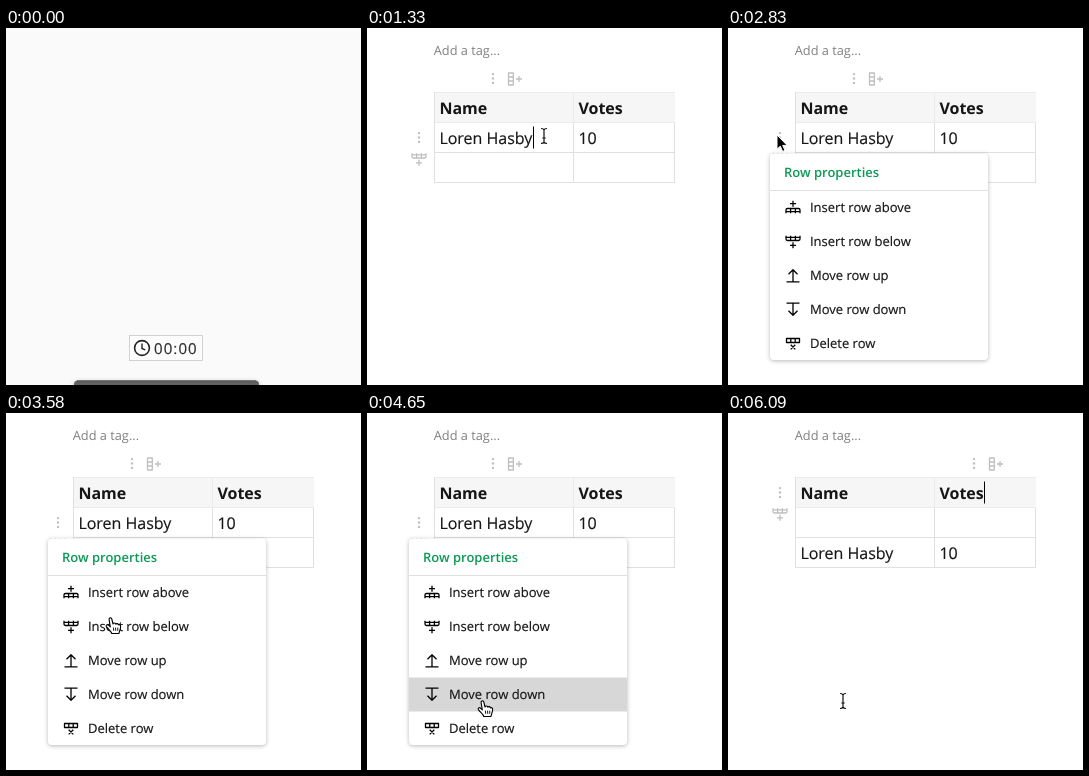
These frames come from a looping animation (355 by 357 pixels, 6170 ms). An HTML page:

```html
<!DOCTYPE html>
<html lang="en">
<head>
<meta charset="utf-8">
<title>Table row menu</title>
<style>
  html, body { margin: 0; width: 100%; height: 100%; overflow: hidden; background: #fff; }
  svg { display: block; width: 355px; height: 357px; font: 16px "Open Sans", sans-serif; fill: #161616; }
  text { stroke: currentColor; stroke-width: .15; text-rendering: geometricPrecision; }
  .line { fill: none; stroke: #e0e0e0; }
  .line.soft { stroke: #ebebeb; }
  .icon { fill: none; stroke: currentColor; stroke-width: 1.3; stroke-linejoin: round; }
  .dots { fill: currentColor; }
  .tool { color: #bfbfbf; }
  .tool.dark { color: #333; }
  .head { font-weight: 700; stroke: none; }
  .small { font-size: 13px; }
  .title { font-size: 13px; font-weight: 600; fill: #0b9a56; stroke: none; }
  .tag { font-size: 12.8px; fill: #808080; stroke: none; }
  .clock { font-size: 15px; letter-spacing: 1.1px; fill: #333; }
  .panel { filter: drop-shadow(0 1px 2px rgba(0, 0, 0, .28)); }
</style>
</head>
<body>
<svg viewBox="0 0 355 357">
  <defs>
    <g id="dots" class="dots">
      <circle cy="-4.4" r="1.2"/><circle r="1.2"/><circle cy="4.4" r="1.2"/>
    </g>
    <path id="below" class="icon" d="M-7-5.8v3.4q0 1.4 1.4 1.4h11.2q1.4 0 1.4-1.4v-3.4M-7-4.2h14M-2.4-5.8v4.8M2.4-5.8v4.8M0 .8v6M-3 3.8h6"/>
    <use id="above" href="#below" transform="scale(1 -1)"/>
    <path id="up" class="icon" d="M-6.5 6.3h13M0 6v-11.5M-4.5-1.2L0-5.7L4.5-1.2"/>
    <path id="down" class="icon" d="M-6.5-6.3h13M0-6v11.5M-4.5 1.2L0 5.7L4.5 1.2"/>
    <path id="delete" class="icon" d="M-6.5-5h13v4h-13zM-2.2-5v4M2.2-5v4M-2.3 1.3l4.6 4.6M2.3 1.3l-4.6 4.6"/>
    <path id="column" class="icon" d="M-6.5-6h4.8v12h-4.8zM-6.5-2h4.8M-6.5 2h4.8M1 0h6M4-3v6"/>
  </defs>

  <g id="intro">
    <rect width="355" height="357" fill="#fafafa"/>
    <rect x="123.5" y="307.5" width="73" height="25" fill="#fcfcfc" stroke="#d2d2d2"/>
    <circle cx="136" cy="320" r="7.4" fill="none" stroke="#222" stroke-width="1.6"/>
    <path d="M136 315.5v5l3.2 1.4" fill="none" stroke="#222" stroke-width="1.4"/>
    <text class="clock" x="148" y="326">00:00</text>
    <rect class="panel" x="68" y="352.5" width="185" height="20" rx="4" fill="#626262"/>
    <path d="M71 353h179" stroke="#505050"/>
  </g>

  <g id="editor">
    <text class="tag" x="66.7" y="27">Add a tag...</text>
    <rect x="67" y="64" width="241" height="31" fill="#f6f6f6"/>
    <path class="line soft" d="M67 64.5H308M67 94.5H308M206.5 64V95"/>
    <path class="line" d="M67 124.5H308M67 154.5H308M67.5 64V155M206.5 95V155M307.5 95V155"/>
    <text class="head" x="72.4" y="86">Name</text>
    <text class="head" x="211.4" y="86">Votes</text>
    <g id="entry">
      <text x="72.4" y="116">Loren Hasby</text>
      <text x="211.4" y="116">10</text>
    </g>
    <g id="colTools" class="tool">
      <use href="#dots" y="50.5"/><use href="#column" x="22" y="51"/>
    </g>
    <rect id="button" x="41" y="98" width="22" height="25" rx="2" fill="#d6d6d6"/>
    <g id="rowTools" class="tool">
      <use href="#dots" x="52"/><use href="#below" x="52" y="21.5"/>
    </g>
    <path id="caret" d="M.5 0v22" stroke="#000"/>
    <g id="menu">
      <rect class="panel" x="42" y="125.5" width="218" height="206.5" rx="4" fill="#fff"/>
      <text class="title" x="56" y="149">Row properties</text>
      <path class="line" d="M42 162.5H260"/>
      <rect id="hover" x="42" width="218" height="34" fill="#d7d7d7"/>
    </g>
    <g id="cursor">
      <path id="beam" d="M-3-7.5Q-.4-7.5 0-6Q.4-7.5 3-7.5M-3 7.5Q-.4 7.5 0 6Q.4 7.5 3 7.5M0-6V6M-1.7 2h3.4" fill="none" stroke="#111" stroke-width="1.2"/>
      <path id="arrow" d="M0 0V14.2L3.3 11.2L5.6 16.4L8 15.4L5.7 10.4H10.2Z" fill="#000" stroke="#fff"/>
      <g id="hand" fill="#fff" stroke="#000" stroke-width="1.1" stroke-linejoin="round">
        <path d="M-1.9 1.6C-2.2-.4 .3-.9 .8 1L2 6C2.4 4.6 4.5 4.7 4.8 6.2C5.4 5.2 7.2 5.5 7.4 6.9C8.2 6.2 9.6 6.8 9.6 8.3C9.8 11 8.4 12.5 8 15.5H.8C.2 13.5-2.5 11.5-4.6 8.6C-5.5 7-3.6 6-2.3 7.3L-.7 8.8Z"/>
        <path d="M2.4 9.6l.3 3.2M4.6 9.6l.1 3.2M6.8 9.6l-.1 3.2" stroke-width=".9"/>
      </g>
    </g>
  </g>
</svg>
<script>
const LOOP = 6170;
const $ = id => document.getElementById(id);
const show = (id, on) => { $(id).style.display = on ? '' : 'none'; };
const move = (id, x, y) => $(id).setAttribute('transform', `translate(${x} ${y})`);

const items = [
  ['above', 'Insert row above'], ['below', 'Insert row below'],
  ['up', 'Move row up'], ['down', 'Move row down'], ['delete', 'Delete row']
];
$('menu').insertAdjacentHTML('beforeend', items.map(([icon, label], i) => `
  <use href="#${icon}" x="65" y="${179.5 + i * 34}"/>
  <text class="small" x="82" y="${184 + i * 34}">${label}</text>`).join(''));

// Stepped glide: n evenly timed poses along an eased straight line
const glide = (kind, t0, t1, n, x0, y0, x1, y1) =>
  Array.from({ length: n }, (_, i) => {
    const p = (i + 1) / n, e = p * p * (3 - 2 * p);
    const t = Math.round((t0 + (t1 - t0) * i / (n - 1)) / 10) * 10;
    return [t, kind, x0 + (x1 - x0) * e, y0 + (y1 - y0) * e];
  });

const cursor = [
  [0, 'beam', 189, 31],
  ...glide('beam', 860, 1330, 7, 189, 31, 177, 108),
  [1500, 'beam', 172, 109], [1580, 'beam', 148, 112], [1660, 'beam', 114, 117],
  [1740, 'beam', 80, 122], [1830, 'hand', 55, 125], [1910, 'hand', 47, 124],
  [1990, 'hand', 48, 115], [2070, 'hand', 50, 110],
  [2670, 'arrow', 49, 107],
  [3340, 'arrow', 58, 122], [3420, 'arrow', 78, 150],
  [3500, 'hand', 97, 182], [3580, 'hand', 105, 205], [3740, 'hand', 108, 217],
  ...glide('hand', 4250, 4650, 6, 108, 217, 116, 288),
  [6010, 'beam', 115, 288]
];
const menuAlpha = [[0, 0], [2670, .35], [2750, .8], [2830, 1], [6010, .35], [6090, 0]];
const hoverRow = [[0, -1], [3500, 0], [3580, -1], [3740, 1], [4330, 2], [4490, 3], [6010, -1]];
const caretOn = [[0, 1], [860, 0], [1330, 1], [2670, 0], [6090, 1]];
const hotTools = [[0, ''], [1830, 'add'], [1990, 'row'], [2670, '']];

const at = (steps, t) => steps.findLast(s => s[0] <= t);

function draw(t) {
  const moved = t >= 6010;
  show('intro', t < 360);
  show('editor', t >= 360);

  move('entry', 0, moved ? 30 : 0);
  move('colTools', moved ? 246 : 126, 0);
  move('rowTools', 0, moved ? 79.5 : 109.5);
  move('caret', moved ? 256 : 166, moved ? 68.5 : 98.5);
  show('caret', at(caretOn, t)[1]);

  const hot = at(hotTools, t)[1];
  $('rowTools').classList.toggle('dark', hot !== '');
  show('button', hot === 'row');

  const alpha = at(menuAlpha, t)[1];
  show('menu', alpha > 0);
  $('menu').style.opacity = alpha;
  const row = at(hoverRow, t)[1];
  show('hover', row >= 0);
  $('hover').setAttribute('y', 162.5 + row * 34);

  const [, kind, x, y] = at(cursor, t);
  move('cursor', x, y);
  for (const k of ['beam', 'arrow', 'hand']) show(k, k === kind);
}

const start = performance.now();
function tick() {
  draw((performance.now() - start) % LOOP);
  requestAnimationFrame(tick);
}
tick();
</script>
</body>
</html>
```
